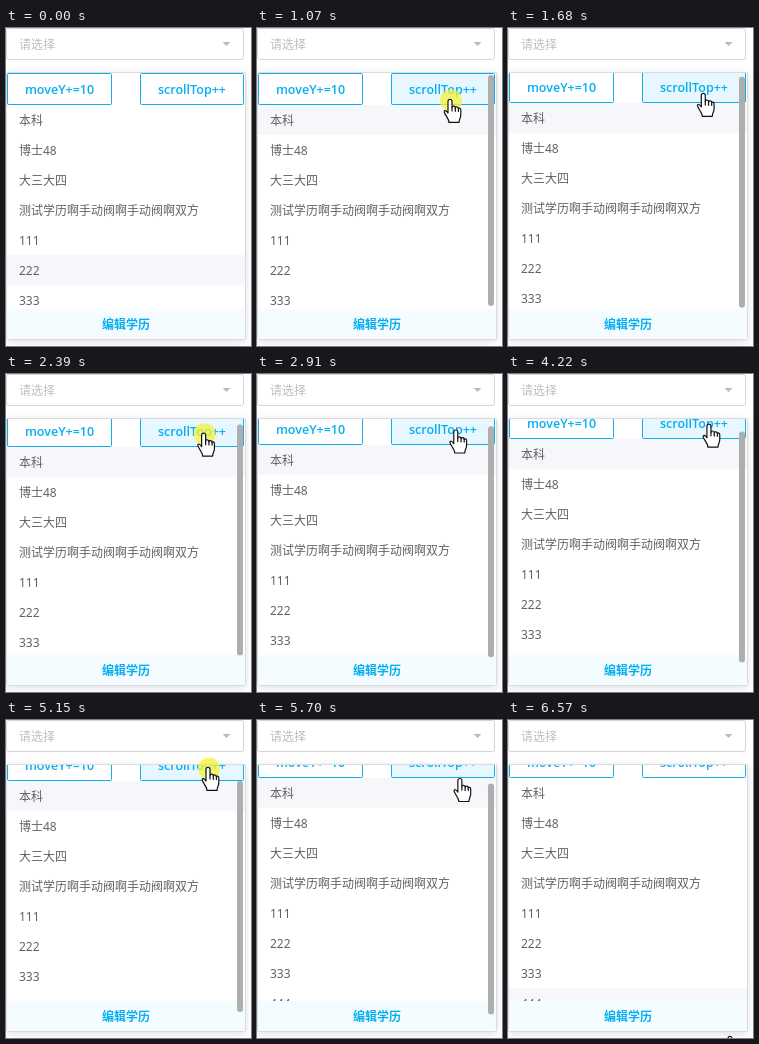
These frames come from a looping animation (245 px wide and 318 px high, 6.63 s). An HTML page:

```html
<!DOCTYPE html>
<html lang="zh-CN">
<head>
<meta charset="utf-8">
<title>Dropdown scroll</title>
<style>
html, body { margin: 0; width: 100%; height: 100%; overflow: hidden; background: #fff; }
svg { display: block; width: 245px; height: 318px; }
text { font: 12px "Noto Sans", "Noto Sans CJK SC", "Noto Sans CJK", sans-serif; fill: #606266; }
.accent { fill: #06aef2; text-anchor: middle; }
.btn text { font: 600 12.5px "Open Sans", "Noto Sans", sans-serif; }
.btn rect { fill: #fff; stroke: #12aeec; }
#panel { filter: drop-shadow(0 2px 4px rgba(0, 0, 0, .12)); }
</style>
</head>
<body>
<svg viewBox="0 0 245 318">
  <defs>
    <clipPath id="view"><rect x="1" y="45" width="238" height="236"/></clipPath>
  </defs>
  <rect x=".5" y=".5" width="237" height="31" rx="2" fill="#fff" stroke="#d4d4d4"/>
  <text x="13" y="21" style="fill:#bfbfbf">请选择</text>
  <path d="M216.500 14h8l-4 4z" fill="#bbb"/>
  <rect id="panel" x=".5" y="44.500" width="239" height="267" rx="1" fill="#fff" stroke="#d9dbdf"/>
  <g clip-path="url(#view)">
    <g id="content">
      <rect id="hover" x="1" width="238" height="30" fill="#f5f7fa"/>
      <g id="rows"></g>
      <g class="btn">
        <rect x="1.500" y="45.500" width="104" height="31" rx="1"/>
        <text class="accent" x="53.500" y="66">moveY+=10</text>
      </g>
      <g class="btn">
        <rect id="hot" x="134.500" y="45.500" width="103" height="31" rx="1"/>
        <text class="accent" x="186" y="66">scrollTop++</text>
      </g>
    </g>
  </g>
  <rect x="1" y="281" width="238" height="30" fill="#f4fcff"/>
  <text class="accent" x="120" y="301" font-weight="700" style="font-weight:700">编辑学历</text>
  <rect id="thumb" x="231" width="6" height="231" rx="3" fill="#aeaeae"/>
  <g id="cursor">
    <circle id="press" cx="1" cy="1.500" r="11" fill="#f7f23a"/>
    <g fill="#fff" stroke="#111" stroke-width="1.200" stroke-linejoin="round" stroke-linecap="round">
      <path d="M-2 2.400a2 2 0 0 1 4 0V8.500C2 6.600 5.300 6.800 5.300 9C5.800 7.400 8.400 7.700 8.400 9.800C8.900 8.700 10.800 9.100 10.800 11V16C10.800 19 9 20 9 23.400H-1C-1 20-5 16-5.800 13C-6 10.600-3.500 11.400-2 14Z"/>
      <path d="M2 8.500v3.500M5.300 9v3.300M8.400 9.800v2.700" fill="none"/>
    </g>
  </g>
</svg>
<script>
const LOOP = 6630, ROW = 30, TOP = 77;
const CLICK_GAP = 211, HOLD = 92;
const $ = id => document.getElementById(id);
const set = (id, name, value) => $(id).setAttribute(name, value);
const clamp = (v, lo, hi) => Math.max(lo, Math.min(hi, v));
const ramp = (t, from, to) => clamp((t - from) / (to - from), 0, 1);

const labels = ['本科', '博士48', '大三大四', '测试学历啊手动阀啊手动阀啊双方', '111', '222', '333', '444'];
$('rows').innerHTML = labels
  .map((s, i) => `<text x="13" y="${TOP + 19.5 + i * ROW}">${s}</text>`).join('');

// Runs of evenly spaced clicks; each release scrolls the list by a pixel.
const burst = (from, count) => Array.from({ length: count }, (_, i) => from + i * CLICK_GAP);
const clicks = [...burst(1145, 2), ...burst(2010, 4), ...burst(3114, 13)];

// Pointer tip: come in to the button, drift up with it, leave downwards.
function tipAt(t) {
  const enter = ramp(t, 230, 690);
  const drift = Math.sqrt(ramp(t, 1450, 5000));
  const leave = ramp(t, 5680, 6160);
  const exit = ramp(t, 6480, 6560);
  return {
    x: 225 - 32 * enter + 9 * drift + 20 * leave,
    y: 234 - 163 * enter - 24 * drift + 254 * leave + 15 * exit
  };
}

function draw(t) {
  const scroll = clicks.filter(c => t >= c).length;
  const pressed = clicks.some(c => t >= c - HOLD && t < c);
  const { x, y } = tipAt(t);
  const row = clamp(Math.floor((y + scroll - TOP) / ROW), 0, labels.length - 1);
  const stay = 1 - ramp(t, 6440, 6550);
  const lit = ramp(t, 560, 760) * stay;

  set('content', 'transform', `translate(0 ${-scroll})`);
  set('hover', 'y', TOP + row * ROW);
  $('hot').style.fill = `rgb(${255 - 25 * lit}, ${255 - 8 * lit}, 255)`;
  set('thumb', 'y', 47 + scroll * 0.87);
  set('thumb', 'opacity', ramp(t, 230, 400) * stay);
  set('cursor', 'transform', `translate(${x} ${y})`);
  set('cursor', 'visibility', t < 230 ? 'hidden' : 'visible');
  set('press', 'opacity', pressed ? 0.75 : 0);
}

const start = performance.now();
function tick() {
  draw((performance.now() - start) % LOOP);
  requestAnimationFrame(tick);
}
tick();
</script>
</body>
</html>
```
